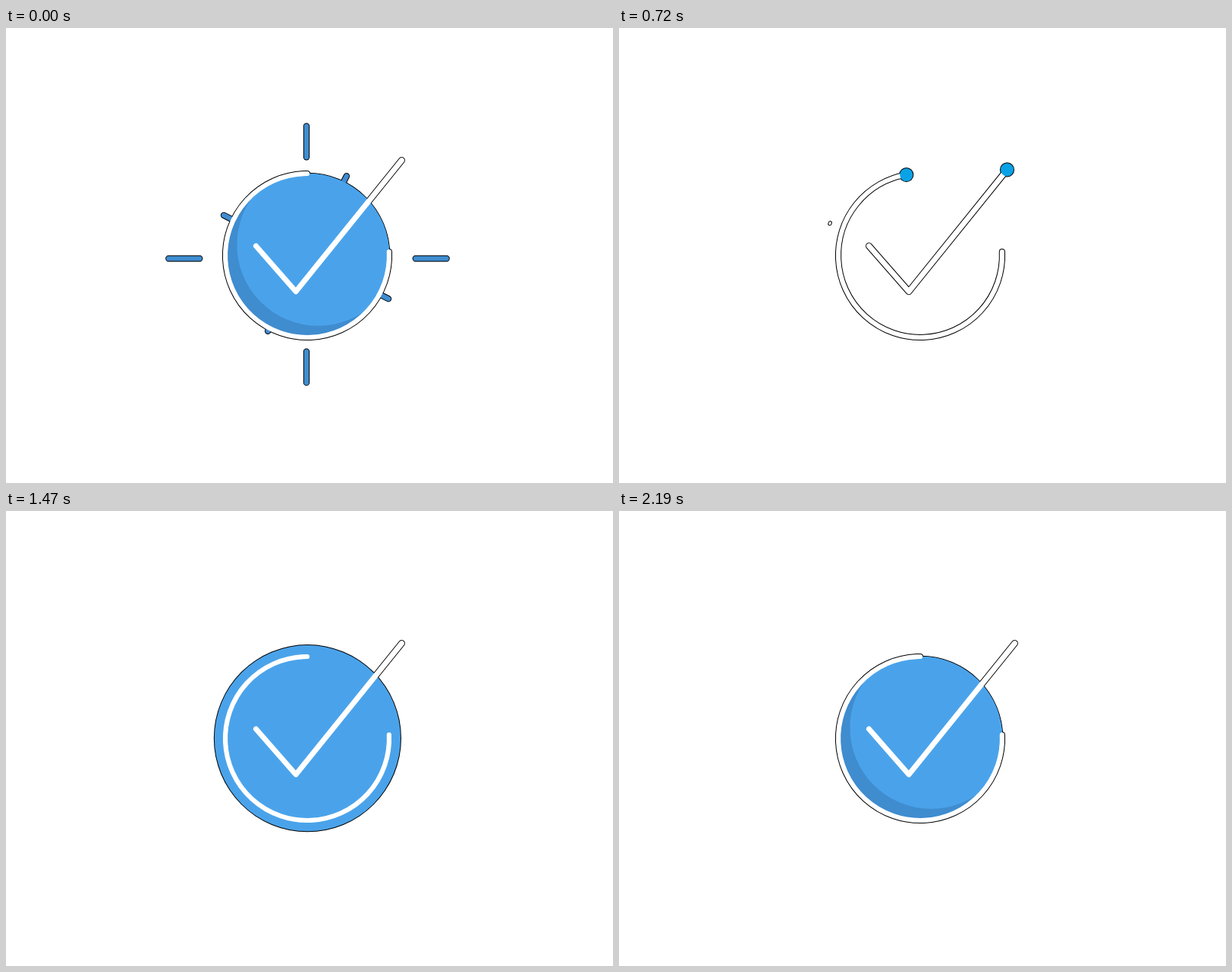
An HTML page with a canvas for the animation above (3270 ms loop, 800 by 600 pixels).

```html
<!DOCTYPE html>
<html lang="en">
<head>
<meta charset="utf-8">
<title>Check mark</title>
<style>
  html, body { margin: 0; width: 100%; height: 100%; overflow: hidden; background: #fff; }
  canvas { display: block; width: 800px; height: 600px; }
</style>
</head>
<body>
<canvas id="stage" width="800" height="600"></canvas>
<script>
const ctx = document.getElementById('stage').getContext('2d');
const LOOP = 3270, STEP = 30, POSTER = 1980, SETTLED = 2190;
const LIGHT = '#4aa3ea', DARK = '#3f8ccf', DOT = '#0aa2e6', WHITE = '#fff';
const CENTER = [397, 300], RING = 108, EDGE = 1;
const CHECK = [[329.5, 287.5], [382, 347.5], [521.5, 174.5]];

// Each axis carries two opposite rays: middle, angle, and reach of both ends.
const AXES = [
  { mid: [397, 304], angle: 0, reach: [185.5, 184.5] },
  { mid: [396, 299], angle: 90, reach: [170.5, 171.5] },
  { mid: [395.5, 302], angle: 26.9, reach: [123.5, 123.5] },
  { mid: [397, 297.5], angle: 116.9, reach: [116.5, 116.5] }
];

const rad = deg => deg * Math.PI / 180;
const progress = (t, from, to) => Math.min(1, Math.max(0, (t - from) / (to - from)));
const ease = x => (1 - Math.cos(Math.PI * x)) / 2;
const eased = (t, from, to) => ease(progress(t, from, to));
const mix = (a, b, k) => a + (b - a) * k;
const polar = ([x, y], r, deg) => [x + r * Math.cos(rad(deg)), y + r * Math.sin(rad(deg))];

function disc(center, radius, color) {
  return {
    color,
    paint(grow) {
      ctx.beginPath();
      ctx.arc(...center, radius + grow, 0, 2 * Math.PI);
      ctx.fill();
    }
  };
}

function stroke(width, color, trace) {
  return {
    color,
    paint(grow) {
      ctx.lineWidth = width + 2 * grow;
      ctx.beginPath();
      trace();
      ctx.stroke();
    }
  };
}

const polyline = (points, width, color) =>
  stroke(width, color, () => points.forEach(p => ctx.lineTo(...p)));

const arc = (radius, from, to, width) =>
  stroke(width, WHITE, () => ctx.arc(...CENTER, radius, rad(from), rad(to)));

function trimmed(points, part) {
  const lengths = points.slice(1).map((p, i) =>
    Math.hypot(p[0] - points[i][0], p[1] - points[i][1]));
  let left = part * lengths.reduce((a, b) => a + b);
  const result = [points[0]];
  for (let i = 0; i < lengths.length && left > 0; i++) {
    const k = Math.min(1, left / lengths[i]);
    result.push(points[i].map((v, axis) => mix(v, points[i + 1][axis], k)));
    left -= lengths[i];
  }
  return result;
}

function rays(t) {
  if (t < 1700 || t >= SETTLED) return [];
  const drop = 109 * ease(Math.abs(t - 1950) / 360);
  const length = 40 + 0.45 * drop;
  return AXES.flatMap(({ mid, angle, reach }) => reach.map((peak, side) => {
    const outer = peak - drop, dir = angle + 180 * side;
    const inner = Math.max(0, outer - length);
    return polyline([polar(mid, inner, dir), polar(mid, outer, dir)], 6.4, DARK);
  }));
}

function ball(t) {
  if (t < 990) return [];
  const settle = eased(t, 1470, 1650);
  const grown = Math.sin(Math.PI / 2 * progress(t, 960, 1470)) ** 1.35;
  const radius = mix(122.6 * grown, RING, settle);
  const center = [397.4, 299.7];
  const body = disc(center, radius, settle ? DARK : LIGHT);
  if (!settle) return [body];
  const shine = disc([center[0] + 14 * settle, center[1] - 14 * settle], radius - settle, LIGHT);
  const clipped = {
    color: LIGHT,
    paint(grow) {
      ctx.save();
      ctx.beginPath();
      ctx.arc(...center, radius, 0, 2 * Math.PI);
      ctx.clip();
      shine.paint(grow);
      ctx.restore();
    }
  };
  return [body, clipped];
}

function streak(t) {
  const head = mix(100, 200, eased(t, 380, 700));
  const tail = mix(100, 200, eased(t, 417, 737));
  return head > 100 && tail < 200 ? [arc(126.3, tail, head, 3)] : [];
}

function tick(t) {
  const ringPart = eased(t, 66, 810), checkPart = eased(t, 200, 810);
  const end = mix(-2.6, 270, ringPart);
  const line = trimmed(CHECK, checkPart);
  const shrink = 1 - progress(t, 770, 840);
  const size = start => 8.6 * progress(t, start, start + 90) * shrink;
  const parts = [], dots = [];
  const addDot = (point, r) => { if (r > 0) dots.push(disc(point, r, DOT)); };
  if (ringPart) {
    parts.push(arc(RING, -2.6, end, 6.2));
    addDot(polar(CENTER, RING, end), size(30));
  }
  if (checkPart) {
    parts.push(polyline(line, 7, WHITE));
    addDot(line[line.length - 1], size(170));
  }
  return [...parts, ...dots];
}

function draw(t) {
  ctx.fillStyle = WHITE;
  ctx.fillRect(0, 0, 800, 600);
  ctx.lineCap = ctx.lineJoin = 'round';
  const shapes = [...rays(t), ...ball(t), ...streak(t), ...tick(t)];
  const paintAll = (grow, color) => shapes.forEach(shape => {
    ctx.fillStyle = ctx.strokeStyle = color || shape.color;
    shape.paint(grow);
  });
  // A black silhouette below leaves one outline around the union of all shapes.
  paintAll(EDGE, '#000');
  paintAll(0);
}

let start;
function frame(now) {
  start ??= now;
  const t = Math.floor(((now - start) % LOOP) / STEP) * STEP;
  draw(t < STEP ? POSTER : t);
  requestAnimationFrame(frame);
}
requestAnimationFrame(frame);
</script>
</body>
</html>
```
